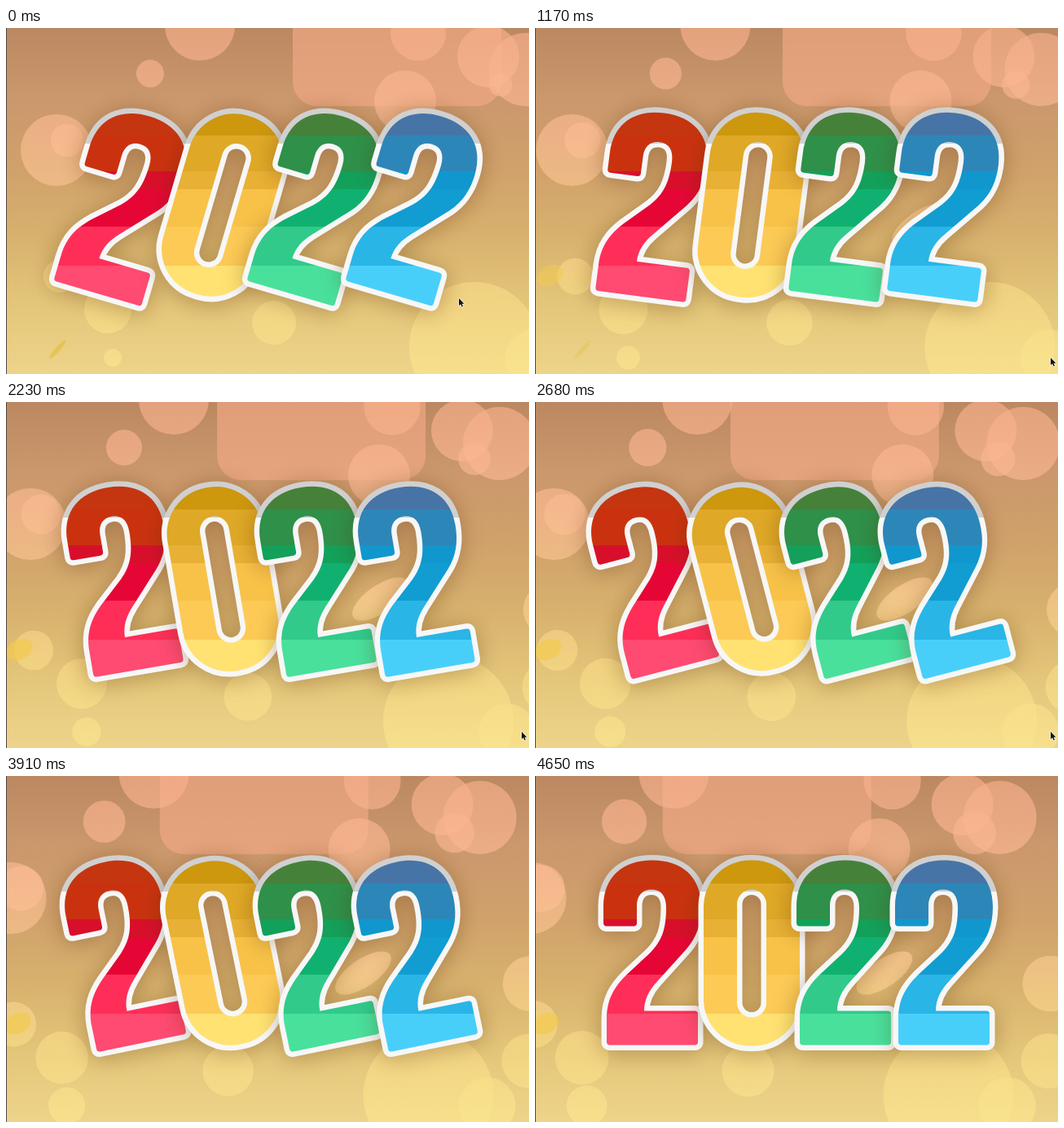
An HTML page with a canvas for the animation above (4750 ms loop, 642 by 425 pixels).

```html
<!DOCTYPE html>
<html lang="en">
<head>
<meta charset="utf-8">
<title>2022</title>
<style>
  html, body { margin: 0; width: 100%; height: 100%; overflow: hidden; background: #d2a56c; }
  canvas { display: block; width: 642px; height: 425px; }
</style>
</head>
<body>
<canvas id="stage" width="642" height="425" role="img" aria-label="2022"></canvas>
<script>
const W = 642, H = 425, LOOP = 4750;
const HOLD = 230, STEP = 152.4;     // first pose lasts longer, then even steps
const SWING = 16.4, HALF = 3050, UPRIGHT = 1600;
const ctx = document.getElementById('stage').getContext('2d');

const lerp = (a, b, p) => a + (b - a) * p;
const clamp = v => Math.max(0, Math.min(1, v));

// Vertical gradients in stage space: blended, or cut hard at the given heights
function smooth(...colors) {
  const g = ctx.createLinearGradient(0, 0, 0, H);
  colors.forEach((c, i) => g.addColorStop(i / (colors.length - 1), c));
  return g;
}

function bands(cuts, ...colors) {
  const g = ctx.createLinearGradient(0, 0, 0, H);
  colors.forEach((c, i) => {
    g.addColorStop((cuts[i - 1] ?? 0) / H, c);
    g.addColorStop((cuts[i] ?? H) / H, c);
  });
  return g;
}

// Digit shapes, centred on 0,0
const two = new Path2D(`M-59 -37 V-57 C-59 -94 -35 -114 1 -114 C37 -114 61 -94 61 -57
  C61 -33 54 -18 43 -5 L6 36 C-3 46 -9 57 -9 71 H53 Q57 71 57 75 V109 Q57 113 53 113
  H-51 Q-55 113 -55 109 V81 C-55 56 -45 41 -31 27 L-2 0 C13 -15 18 -30 18 -56
  C18 -71 11 -78 0 -78 C-11 -78 -18 -71 -18 -58 V-37 Q-18 -33 -22 -33 H-55 Q-59 -33 -59 -37 Z`);
const zero = new Path2D();
zero.roundRect(-59, -114, 118, 228, 57);
zero.roundRect(-18, -78, 36, 157, 18);

const tone = (...colors) => bands([132, 176, 198, 244, 292], ...colors);
const digits = [
  { x: 143, shape: two, paint: tone('#c5350f', '#ca320f', '#d80f2b', '#e60635', '#ff2e58', '#ff4a71') },
  { x: 266, shape: zero, paint: tone('#cd970e', '#dfa826', '#e8b034', '#f8c248', '#fcca55', '#ffe272') },
  { x: 380, shape: two, paint: tone('#46813a', '#2e9049', '#13a05a', '#10b170', '#31ca8b', '#49e09c') },
  { x: 501, shape: two, paint: tone('#4774a6', '#2d86b8', '#1097cd', '#119dd2', '#29b5e6', '#48cff9') }
];
const rim = bands([142], '#d0d0d0', '#f7f7f7');

const base = smooth('#bb8861', '#cb976c', '#d0a16b', '#d7b16d', '#e4c67a', '#edd48a');
const glow = smooth('#f8b08b', '#fbb993', '#fac792', '#f8da86', '#fbe58e');

// Main bokeh discs: x, y, radius at the start
const discs = [
  [238, -3, 43], [177, 56, 17], [506, 6, 34], [490, 90, 38], [592, 35, 38], [638, 51, 45], [607, 70, 14],
  [62, 150, 44], [75, 138, 20], [66, 305, 20], [125, 346, 29], [131, 405, 11], [329, 362, 27],
  [575, 392, 80], [700, 255, 32], [698, 350, 31], [647, 405, 34]
];

function oval(x, y, rx, ry, turn, paint, alpha) {
  ctx.globalAlpha = alpha;
  ctx.fillStyle = paint;
  ctx.beginPath();
  ctx.ellipse(x, y, rx, ry, turn, 0, 7);
  ctx.fill();
  ctx.globalAlpha = 1;
}

function backdrop(s) {
  ctx.fillStyle = base;
  ctx.fillRect(0, 0, W, H);

  // Wide rosy patch sliding behind the discs
  ctx.globalAlpha = 0.65;
  ctx.fillStyle = '#f3ab86';
  ctx.beginPath();
  ctx.roundRect(352 - 42 * s, -40, 256, 136, 30);
  ctx.fill();

  // All discs drift left; small ones swell as they go
  for (const [x, y, r] of discs) {
    const size = r + Math.max(0, 36 - r) * 0.12 * s;
    oval(x - 14.5 * s, y, size, size, 0, glow, 0.65);
  }
  oval(487 - 12.5 * s, 242, 40, 17, -0.6, glow, 0.8);
  oval(63 - 4 * s, 395, 15, 3, -0.85, '#e6c04a', clamp(1.6 - s) * 0.8);
  oval(20 - 1.5 * s, 304, 17, 12, -0.5, '#f3cb4f', clamp(s - 0.4) * 0.7);

  ctx.fillStyle = '#54484a';
  ctx.fillRect(0, 0, 1, H);
}

function shadow(on) {
  ctx.shadowColor = on ? 'rgba(85,45,5,.27)' : 'transparent';
  ctx.shadowBlur = on ? 28 : 0;
  ctx.shadowOffsetY = on ? 3 : 0;
}

function drawDigit({ x, shape, paint }, angle) {
  const path = new Path2D();
  path.addPath(shape, new DOMMatrix().translate(x, 217.5).rotate(angle));
  ctx.lineWidth = 13;
  ctx.lineJoin = 'round';
  ctx.strokeStyle = ctx.fillStyle = rim;
  shadow(true);
  ctx.fill(path, 'evenodd');
  ctx.stroke(path);
  shadow(false);
  ctx.fillStyle = paint;
  ctx.fill(path, 'evenodd');
}

const arrow = new Path2D('M0 0 V9 L2 7.2 L3.6 10.6 L5 10 L3.5 6.7 H6.4 Z');

function cursor(s) {
  if (s > 2.95) return;
  const p = clamp((s - 0.2) / 0.65), e = p * p * (3 - 2 * p);
  ctx.save();
  ctx.translate(lerp(556, 633, e), lerp(332, 405, e));
  ctx.lineWidth = 1.4;
  ctx.strokeStyle = 'rgba(255,255,255,.8)';
  ctx.stroke(arrow);
  ctx.fillStyle = '#111';
  ctx.fill(arrow);
  ctx.restore();
}

function draw(t) {
  const angle = SWING * Math.sin(Math.PI * (UPRIGHT - t) / HALF);
  backdrop(t / 1000);
  for (const d of digits) drawDigit(d, angle);
  cursor(t / 1000);
}

function tick() {
  const t = performance.now() % LOOP;
  draw(t < HOLD ? 0 : HOLD + Math.floor((t - HOLD) / STEP) * STEP);
  requestAnimationFrame(tick);
}
tick();
</script>
</body>
</html>
```
